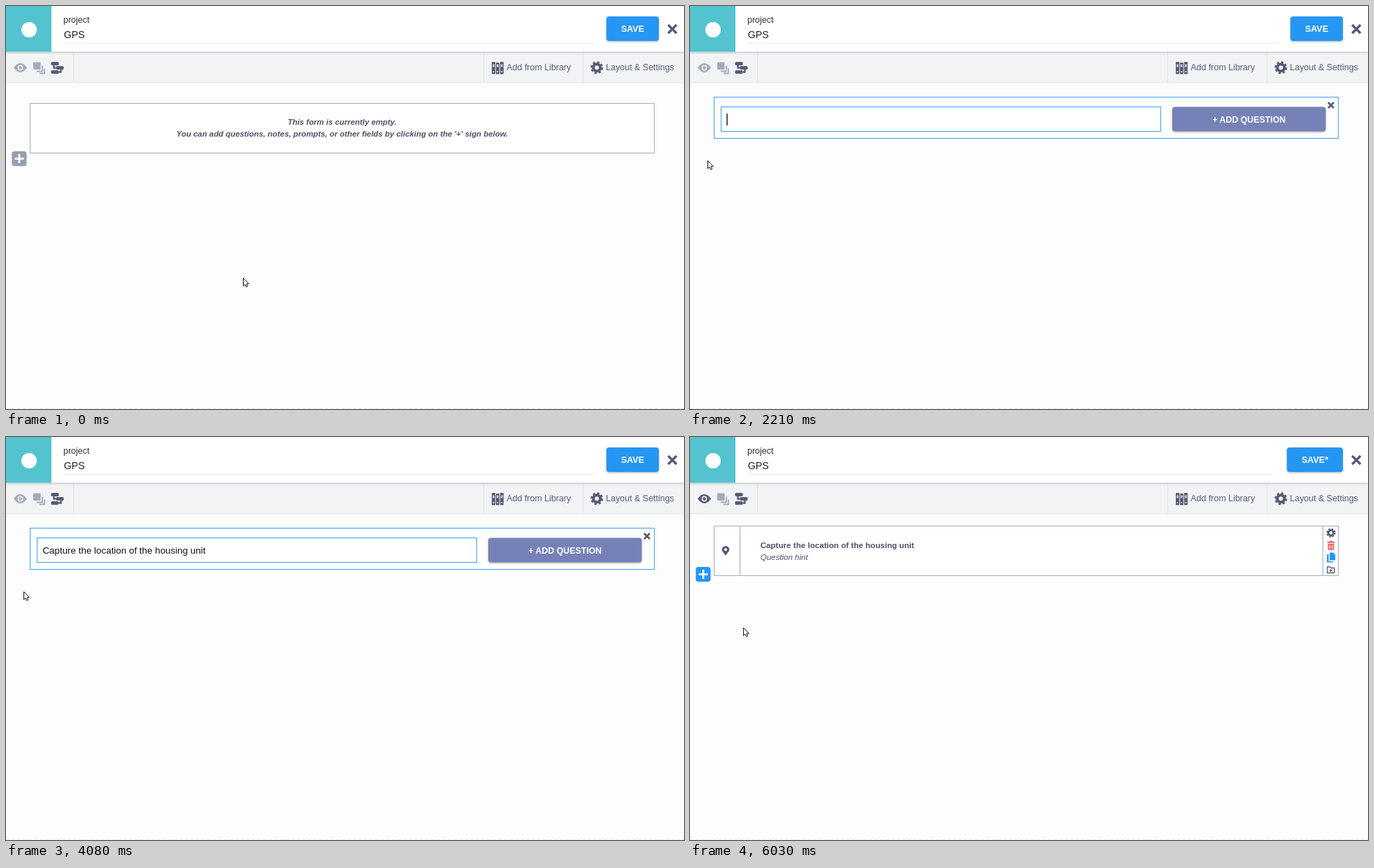
An HTML page that plays this animation: 970x577 px, repeating every 6.73 s.

```html
<!DOCTYPE html>
<html lang="en">
<head>
<meta charset="utf-8">
<title>Form builder</title>
<style>
  html, body { margin: 0; width: 100%; height: 100%; overflow: hidden; background: #fdfdfd; }
  svg { display: block; font-family: "Liberation Sans", Arial, sans-serif; }
  .shadow { filter: drop-shadow(0 1px 1.5px #0005); }
  .mini { font: bold 9.6px Roboto, sans-serif; text-anchor: middle; }
  .line { fill: none; stroke: currentColor; stroke-width: 2; }
  .cut { fill: none; stroke: #fff; stroke-width: 1.4; }
</style>
</head>
<body>
<svg id="stage" width="970" height="577" viewBox="0 0 970 577"></svg>
<script>
const LOOP = 6730;
const BLUE = '#2596f4', SLATE = '#565b75', MUTED = '#a4aabb', INK = '#2c3044';
const QUESTION = 'Capture the location of the housing unit';

const text = (x, y, size, str, attrs = '') =>
  `<text x="${x}" y="${y}" font-size="${size}" ${attrs}>${str}</text>`;
const rect = (x, y, w, h, attrs = '') =>
  `<rect x="${x}" y="${y}" width="${w}" height="${h}" ${attrs}/>`;
const path = (d, attrs = '') => `<path d="${d}" ${attrs}/>`;
const line = (d, width = 2) => path(d, `class="line" style="stroke-width:${width}"`);
const cut = d => path(d, 'class="cut"');
const dot = (x, y, r, attrs = '') => `<circle cx="${x}" cy="${y}" r="${r}" ${attrs}/>`;
const mini = str => `<text class="mini" y="4">${str}</text>`;
const cross = (x, y, r, width) =>
  path(`M${x - r} ${y - r}l${2 * r} ${2 * r}m0 ${-2 * r}l${-2 * r} ${2 * r}`,
    `stroke="${SLATE}" stroke-width="${width}"`);

// Icons are drawn around 0,0 in the current colour.
const EYE = 'M-9.5 0Q-5-6.4 0-6.4T9.5 0Q5 6.4 0 6.4T-9.5 0z';
const ICONS = {
  eye: path(EYE) + dot(0, 0, 3.9, 'fill="#f1f3f5"') + dot(0, 0, 2.3),
  stack: rect(-8, -8, 10.5, 10.5, 'rx="1"') + line('M-3 5H5V-3M1 8H8V1', 1.8),
  tree: rect(-9, -8.5, 11, 5, 'rx="1.5"') + rect(-2, -2.5, 11, 5, 'rx="1.5"') +
    rect(-9, 3.5, 11, 5, 'rx="1.5"') + line('M-5-4V0H-2M5 2V6H2', 2.4),
  books: [-8.5, -2.6, 3.4].map((x, i) => rect(x, -8.5 + i % 2, 5, 17.5 - i % 2, 'rx="1"') +
    cut(`M${x + 1.3} -4h2.4m-2.4 2h2.4`) + dot(x + 2.5, 5.5, 1, 'fill="#fff"')).join(''),
  gear: dot(0, 0, 5, 'class="line" style="stroke-width:4"') +
    dot(0, 0, 7.8, 'class="line" stroke-dasharray="3.4 2.726" style="stroke-width:2.4"'),
  radio: dot(0, 0, 6.3) + dot(0, 0, 2.3, 'fill="#fff"'),
  list: [-5, 0, 5].map(y => dot(-6, y, 1.3) + line(`M-3 ${y}H7`, 1.7)).join(''),
  abc: mini('abc'), digits: mini('123'), decimal: mini('1.0'), sum: mini('1+1'), range: mini('1..1'),
  date: rect(-6, -5, 12, 12, 'rx="1"') + line('M-3-7V-4M3-7V-4') +
    cut('M-6-1.8H6M-4 1.2H4M-4 4.2H4M-1.5 0V6M1.5 0V6'),
  clock: dot(0, 0, 6.6) + cut('M0-4V.3L3 2.2'),
  dateTime: rect(-.5, -1, 8, 8, 'rx="1"') + line('M5-4V0') + dot(-2.6, -2.6, 5.2, 'fill="#fff"') +
    dot(-2.6, -2.6, 4.5) + cut('M-2.6-5.2V-2.4H-.5M1.5 2.5H6'),
  pin: path('M0 7C-2 3-5.3 1-5.3-1.8A5.3 5.3 0 0 1 5.3-1.8C5.3 1 2 3 0 7z') +
    dot(0, -1.8, 2, 'fill="#fff"'),
  photo: rect(-6.3, -4.8, 12.6, 9.8, 'rx="1" class="line" style="stroke-width:1.6"') +
    path('M-5 4V2L-2-1 0 1 3-3 5 0V4z') + dot(-3, -2.4, 1.2),
  audio: path('M-7-2.8H-4L1-6V6L-4 2.8H-7z') + path('M3-3Q7-3 7 0T3 3z'),
  video: rect(-7.5, -5, 10, 10, 'rx="1"') + path('M3.5-1L7.5-4.5V4.5L3.5 1z'),
  share: line('M4-4L-4 0 4 4', 1.6) + dot(4, -4, 2.4) + dot(-4, 0, 2.4) + dot(4, 4, 2.4),
  note: line('M-6-4.5H6M-6 0H6M-6 4.5H6', 1.7),
  tiles: [[-6, -6], [1, -6], [-6, 1]].map(([x, y]) => rect(x, y, 5, 5)).join('') +
    path('M1 1H3.5V3H6V6H3.5V4H1z'),
  check: rect(-6, -6, 12, 12, 'rx="1.5"') + path('M-3.5 0L-1 2.7 3.7-2.7', 'class="cut" style="stroke-width:2"'),
  area: rect(-6, -6, 12, 12, 'rx="1"'),
  rating: line('M-6-4H0M2-4H6M-6 0H-3M-1 0H6M-6 4H1M3 4H6', 1.7),
  matrix: rect(-6.5, -5.5, 13, 11, 'rx="1" class="line" style="stroke-width:1.6"') +
    line('M-6-4H6', 3) + line('M-6 1H6M0-4V5', 1.6),
  ranking: line('M-4-6V5M0-5H7M0-1.5H5M0 2H3.5M0 5.5H2', 1.6) + path('M-7 3H-1L-4 6.5z'),
  hidden: path(EYE, 'transform="scale(.82)"') + dot(0, 0, 3.3, 'fill="#fff"') + dot(0, 0, 2) +
    path('M-7.5-7L7 5.5', 'class="cut"') + line('M-8-6L7.5 6.5', 1.6),
  file: path('M-5-6.5H1.5V-2.5H5V6.5H-5z') + path('M2.5-6.5L5-3.5H2.5z'),
  xml: path('M-6-7H1L4-4V7H-6z') + cut('M-3-3L-1 0-3 3M1-3V1') +
    rect(.5, 1, 8, 7, 'fill="#fff"') + rect(1.5, 3, 6, 4.5) + line('M3 3V1.5H6V3', 1.2),
  trash: path('M-5.5-5.5H-2L-1-7H1L2-5.5H5.5V-3.5H-5.5zM-4.7-2.5H4.7V7H-4.7z') + cut('M-2 0V5M2 0V5'),
  copy: path('M-2-7H3L6-4V4H-2z') + path('M-6-4.5H-3.5V5.5H3V7H-6z'),
  folder: path('M-5-4H-1L.5-2.5H5V4.5H-5z', 'class="line" style="stroke-width:1.3"') +
    line('M0-1V3M-2 1H2', 1.3),
};
const icon = (name, x, y, color, attrs = '', scale = 1) =>
  `<g transform="translate(${x} ${y}) scale(${scale})" color="${color}" fill="currentColor" ${attrs}>${ICONS[name]}</g>`;

const plus = (y, color, id) => rect(8.3, y, 21.2, 21.2, `rx="4" fill="${color}" id="${id}"`) +
  path(`M12.5 ${y + 10.6}h13m-6.5 -6.5v13`, 'stroke="#fff" stroke-width="2.8"');

const TYPES = [
  ['radio', 'Select One'], ['list', 'Select Many'], ['abc', 'Text'], ['digits', 'Number'],
  ['decimal', 'Decimal'], ['date', 'Date'], ['clock', 'Time'], ['dateTime', 'Date &amp; time'],
  ['pin', 'Point'], ['photo', 'Photo'], ['audio', 'Audio'], ['video', 'Video'],
  ['share', 'Line'], ['note', 'Note'], ['tiles', 'Barcode / QR Code'], ['check', 'Acknowledge'],
  ['area', 'Area'], ['rating', 'Rating'], ['matrix', 'Question Matrix'], ['ranking', 'Ranking'],
  ['sum', 'Calculate'], ['hidden', 'Hidden'], ['file', 'File'], ['range', 'Range'],
  ['xml', 'External XML'],
];
const typeCell = ([name, label], i) => {
  const x = 51 + i % 4 * 221.6, y = 205.4 + Math.floor(i / 4) * 36.15;
  return `<g id="type${i}" color="${i ? INK : BLUE}" fill="currentColor">` +
    icon(name, x, y, 'inherit') + text(x + 16.6, y + 3.3, 9.6, label, 'font-weight="bold"') + '</g>';
};

const header =
  rect(0, 66, 970, 43.5, 'fill="#f1f3f5"') +
  rect(0, 109, 970, 1, 'fill="#e4e7eb"') + rect(0, 110, 970, 2, 'fill="#f8f8f9"') +
  [96, 683, 825].map(x => rect(x, 67, 1, 42, 'fill="#e2e5e9"')).join('') +
  rect(0, 0, 970, 65.5, 'fill="#fff" style="filter:drop-shadow(0 1px 1.5px #0004)"') +
  rect(0, 0, 65, 65.5, 'fill="#53c3cf"') + dot(33, 34, 11, 'fill="#fff"') +
  text(82, 24, 12.5, 'project', 'fill="#333"') + text(82.7, 45.7, 14.2, 'GPS', 'fill="#222"') +
  rect(82, 53, 760, 1, 'id="underline" fill="#ececec"') +
  rect(859, 15, 75, 35, `id="save" class="shadow" rx="4" fill="${BLUE}"`) +
  text(913, 36.5, 12.5, 'SAVE', 'id="saveLabel" font-weight="bold" fill="#fff" text-anchor="end"') +
  cross(953.3, 33, 6, 3.4) +
  icon('eye', 20.5, 88.5, MUTED, 'id="eye"') + icon('stack', 47, 88.5, MUTED) +
  icon('tree', 73.5, 88.5, SLATE) + icon('books', 703.5, 88.5, SLATE) + icon('gear', 845.3, 88.3, SLATE) +
  text(716.3, 91.5, 12.45, 'Add from Library', `fill="${SLATE}"`) +
  text(858.3, 91.5, 12.45, 'Layout &amp; Settings', `fill="${SLATE}"`) +
  path('M0 576.5H970', 'stroke="#e6e6e6" stroke-dasharray="5 3"');

const note = 'font-weight="bold" font-style="italic" text-anchor="middle" fill="#4d5168"';
const blueBox = `fill="#fff" stroke="#3d9fec"`;
const greyBox = `fill="#fff" stroke="#a6abbd"`;

const views = {
  empty: rect(34.5, 139.5, 893, 71, greyBox) +
    text(481, 169.7, 11.4, 'This form is currently empty.', note) +
    text(481, 187.4, 11.4, "You can add questions, notes, prompts, or other fields by clicking on the '+' sign below.", note) +
    plus(208, '#989fb4', 'plus'),
  input: rect(34.5, 130.5, 893, 59, blueBox) + rect(44.5, 144.5, 629, 35, blueBox) +
    rect(690, 144.5, 219.5, 35, 'class="shadow" rx="4" fill="#7682b7"') +
    text(799.8, 166.7, 12.35, '+ ADD QUESTION', 'font-weight="bold" fill="#fff" text-anchor="middle"') +
    cross(917, 142, 4, 2.8) +
    text(52.4, 167, 13.4, '', 'id="typed" fill="#111"') + rect(52.4, 154, 1.3, 17, 'id="caret"'),
  menu: rect(34.5, 130.5, 893, 311, blueBox) +
    path('M34 184.5H472.5L481 177 489.5 184.5H928', `fill="none" stroke="#3d9fec"`) +
    cross(917, 142, 4, 2.8) + text(69.8, 163, 12.53, QUESTION, 'font-weight="bold"') +
    rect(38.8, 189.5, 218.4, 32.4, `rx="2" fill="#fff" stroke="${BLUE}" stroke-width="1.7"`) +
    TYPES.map(typeCell).join(''),
  question: rect(34.5, 127.5, 893, 71, greyBox) + path('M71.5 127V199M905.5 127V199', greyBox) +
    icon('pin', 51, 163, SLATE) +
    text(100.7, 158.6, 11.62, QUESTION, 'font-weight="bold" fill="#4d5168"') +
    text(100.7, 176.3, 11.55, 'Question hint', 'font-style="italic" fill="#4d5168"') +
    icon('gear', 917, 137.3, SLATE, '', .74) + icon('trash', 917, 155, '#f4616b', '', .95) +
    icon('copy', 917.2, 172.6, BLUE) + icon('folder', 916.8, 190, SLATE) +
    plus(186, BLUE, 'plusDone'),
};

const pointer = 'fill="#fff" stroke="#111" stroke-linejoin="round"';
const cursors =
  path('M.5.5V11.8L3 9.6 4.8 13.2 6.7 12.3 5 8.8H8.4z', `id="arrow" ${pointer}`) +
  path('M-1.4 8.5V1.3Q0-.6 1.4 1.3V5.4Q3 4.6 4 6 5.6 5.3 6.4 6.8 8.4 6.5 8.4 8.6V11L7 14.6H0L-4 9.6Q-4.2 7.6-2.6 8zM1.4 5.4V8M4 6V8.5M6.4 6.8V9',
    `id="hand" ${pointer}`);

const $ = id => document.getElementById(id);
$('stage').innerHTML = header +
  Object.entries(views).map(([id, markup]) => `<g id="${id}">${markup}</g>`).join('') +
  `<g id="cursor">${cursors}</g>`;

const show = (id, on) => $(id).setAttribute('display', on ? 'inline' : 'none');

// Time, x, y of the pointer's hot spot.
const MOVES = [
  [70, 339, 389], [730, 40, 224], [880, 25, 222], [1180, 25, 222], [1190, 25, 221],
  [4840, 25, 221], [5390, 76, 272.5],
];
function pointerAt(t) {
  const i = MOVES.findIndex(move => move[0] > t);
  if (i < 0) return MOVES[MOVES.length - 1].slice(1);
  if (i === 0) return MOVES[0].slice(1);
  const [t0, x0, y0] = MOVES[i - 1], [t1, x1, y1] = MOVES[i];
  const u = (t - t0) / (t1 - t0), k = u * u * (3 - 2 * u);
  return [x0 + (x1 - x0) * k, y0 + (y1 - y0) * k];
}

function typedCount(t) {
  const keys = (start, step, max) => t < start ? 0 : Math.min(max, 1 + Math.floor((t - start) / step));
  const first = t >= 2850 ? 13 : keys(2257.5, 47.5, 12);
  return first + keys(2920, 40, 17) + keys(3610, 35.5, 10);
}

function draw(t) {
  const view = t < 1130 ? 'empty' : t < 4280 ? 'input' : t < 5720 ? 'menu' : 'question';
  for (const id in views) show(id, id === view);

  const [x, y] = pointerAt(t);
  const onPlus = view === 'empty' && x < 29.5;
  const onMenu = view === 'menu' && x > 38;
  $('cursor').setAttribute('transform', `translate(${x} ${y})`);
  show('hand', onPlus || onMenu);
  show('arrow', !(onPlus || onMenu));
  $('plus').setAttribute('fill', onPlus ? BLUE : '#989fb4');
  $('type4').setAttribute('color', onMenu && y < 259.5 ? BLUE : INK);
  $('type8').setAttribute('color', onMenu && y >= 259.5 ? BLUE : INK);

  if (view === 'input') {
    $('typed').textContent = QUESTION.slice(0, typedCount(t)).replace(/ /g, '\u00a0');
    $('caret').setAttribute('x', 52.4 + $('typed').getComputedTextLength());
    show('caret', t < 1690 || t >= 2210 && t < 4080);
  }

  const unsaved = t >= 6030;
  $('save').setAttribute('x', unsaved ? 854 : 859);
  $('save').setAttribute('width', unsaved ? 80 : 75);
  $('saveLabel').textContent = unsaved ? 'SAVE*' : 'SAVE';
  $('underline').setAttribute('width', unsaved ? 753 : 760);
  $('eye').setAttribute('color', unsaved ? SLATE : MUTED);
}

const start = performance.now();
function tick() {
  draw((performance.now() - start) % LOOP);
  requestAnimationFrame(tick);
}
tick();
</script>
</body>
</html>
```
